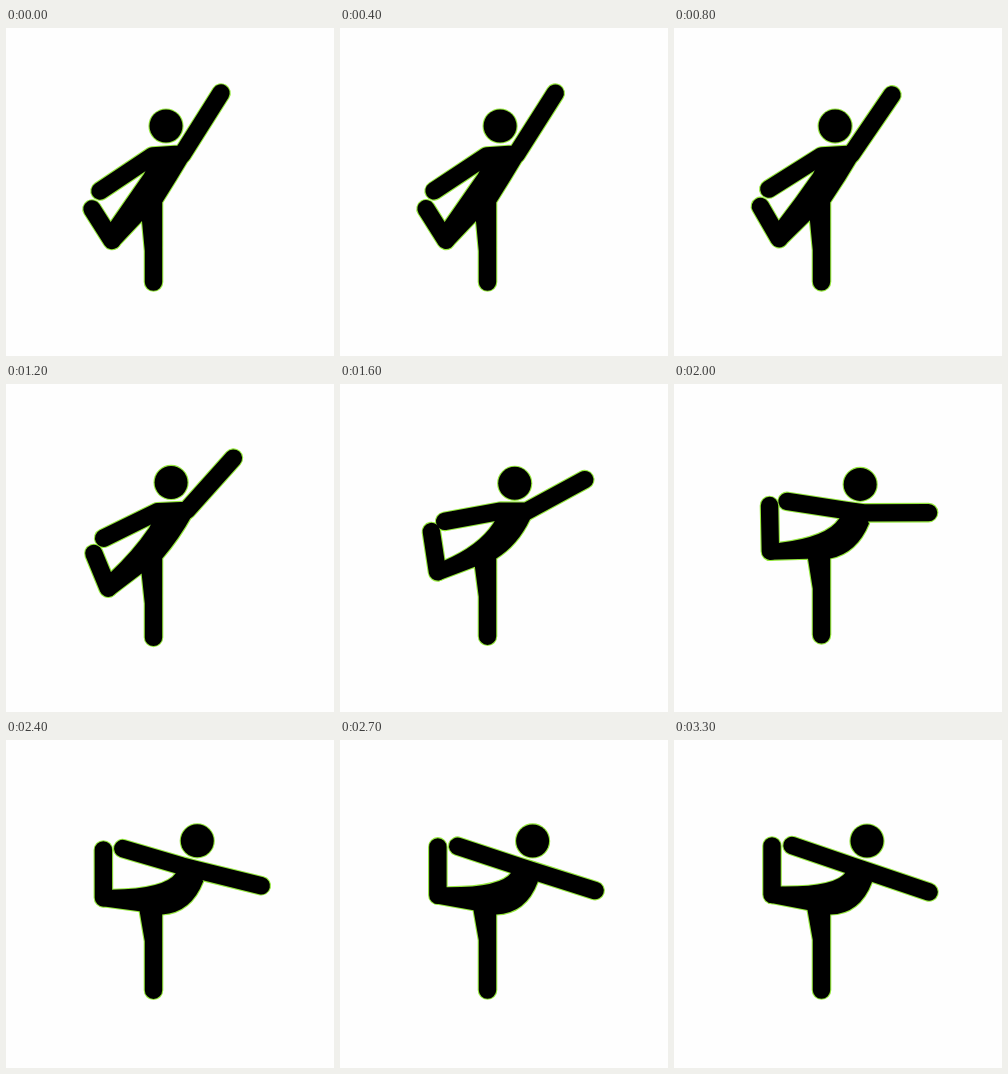
An HTML page with a canvas that plays this animation: 328x328 px, repeating every 3.7 s.

```html
<!DOCTYPE html>
<html lang="en">
<head>
<meta charset="utf-8">
<title>Dancer pose</title>
<style>
html, body { margin: 0; width: 100%; height: 100%; overflow: hidden; background: #fefefe; }
canvas { display: block; width: 328px; height: 328px; }
</style>
</head>
<body>
<canvas id="stage" width="328" height="328"></canvas>
<script>
const ctx = document.getElementById('stage').getContext('2d');
const LIMB = 17.4, HEAD = 16.5, RIM = 2.2;
const LOOP = 3700, STEP = 100, MOVE = 3300;

const mix = (a, b, p) => a + (b - a) * p;
const glide = (a, b, p) => [mix(a[0], b[0], p), mix(a[1], b[1], p)];
// Moves from a to b, pulled towards c
const swing = (a, c, b, p) => glide(glide(a, c, p), glide(c, b, p), p);

function ease(x) {
  const half = y => Math.pow(2 * y, 3.7) / 2;
  return x < 0.5 ? half(x) : 1 - half(1 - x);
}

function poseAt(p) {
  const pose = {
    head: glide([160, 98], [193, 101], p),
    frontHand: swing([215, 65], [259, 92], [255, 152], p),
    frontShoulder: swing([176.5, 126], [191, 127], [190, 130], p),
    backShoulder: glide([146.5, 128], [178, 126], p),
    backHand: glide([94, 163], [118, 105.5], p),
    foot: glide([86, 181], [98, 106], p),
    knee: swing([106, 212.5], [92, 186], [98, 154.5], p),
    kneePit: swing([104, 195], [102, 178], [106, 146.5], p),
    armpit: glide([138, 146], [172, 132], p),
    chest: glide([183.5, 130], [198, 142], p),
    belly: glide([171, 151], [186, 174], p),
    crotch: glide([136, 193], [133.5, 170], p),
    sole: mix(254, 250, p)
  };
  const [x, y] = glide(pose.armpit, pose.kneePit, 0.5);
  pose.thigh = [x + 23 * p, y + 8 * p];
  return pose;
}

function limb(...points) {
  const path = new Path2D();
  points.forEach(pt => path.lineTo(...pt));
  return path;
}

function body(p) {
  const path = new Path2D();
  const r = LIMB / 2, legX = 147.5;
  const [kx, ky] = p.knee, [cx, cy] = p.crotch;
  const k = r / Math.hypot(cx - kx, cy - ky);
  path.moveTo(...p.backShoulder);
  path.lineTo(...p.armpit);
  path.quadraticCurveTo(...p.thigh, ...p.kneePit);
  path.lineTo(kx, ky);
  path.lineTo(kx - (cy - ky) * k, ky + (cx - kx) * k);
  path.lineTo(cx, cy);
  path.lineTo(legX - r, cy + 30);
  path.arc(legX, p.sole, r, Math.PI, 0, true);
  path.lineTo(legX + r, 174.5);
  path.quadraticCurveTo(...p.belly, ...p.chest);
  path.lineTo(...p.frontShoulder);
  path.closePath();
  return path;
}

function draw(t) {
  const p = poseAt(ease(t / MOVE));
  const head = new Path2D();
  head.arc(...p.head, HEAD, 0, Math.PI * 2);
  const solids = [body(p), head];
  const limbs = [
    limb(p.backHand, p.backShoulder, p.frontShoulder, p.frontHand),
    limb(p.foot, p.knee)
  ];
  const paint = (color, rim) => {
    ctx.fillStyle = ctx.strokeStyle = color;
    ctx.lineWidth = LIMB + rim;
    limbs.forEach(s => ctx.stroke(s));
    ctx.lineWidth = rim;
    solids.forEach(s => {
      ctx.fill(s);
      if (rim) ctx.stroke(s);
    });
  };
  ctx.fillStyle = '#fefefe';
  ctx.fillRect(0, 0, 328, 328);
  ctx.lineCap = ctx.lineJoin = 'round';
  paint('#94e63c', RIM);
  ctx.lineWidth = 1;
  paint('#000', 0);
}

const start = performance.now();
function tick() {
  const t = (performance.now() - start) % LOOP;
  draw(Math.min(MOVE, Math.floor(t / STEP) * STEP));
  requestAnimationFrame(tick);
}
tick();
</script>
</body>
</html>
```
